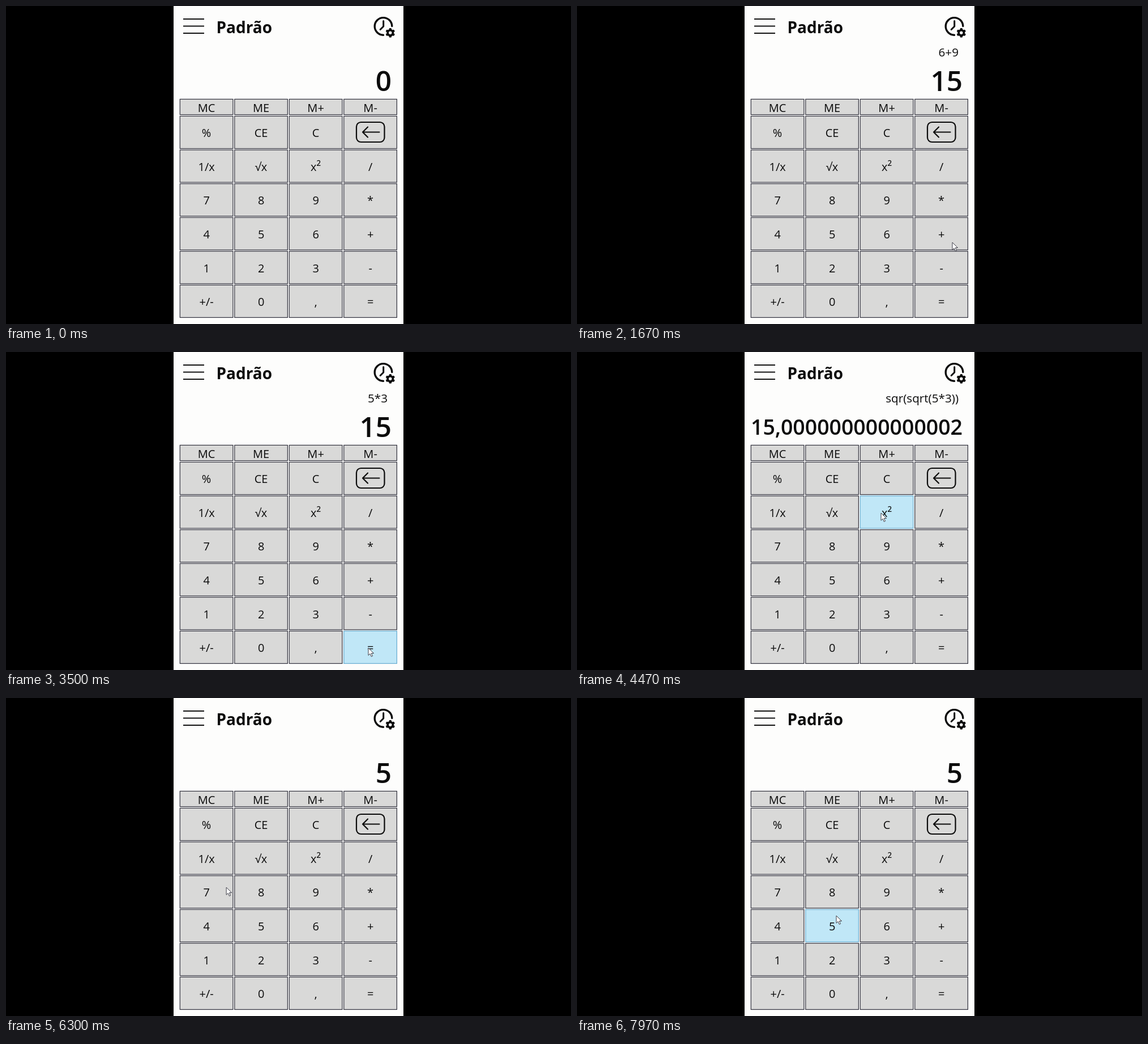
An HTML page that plays this animation: 998 by 561 pixels, repeating every 8000 ms.

```html
<!DOCTYPE html>
<html lang="pt">
<head>
<meta charset="utf-8">
<title>Calculadora</title>
<style>
  html, body { margin: 0; width: 100%; height: 100%; overflow: hidden; background: #000; }
  svg { display: block; width: 100%; height: 100%; }
  text { font-family: "Open Sans", "Noto Sans", sans-serif; fill: #0b0b0b; white-space: pre; }
  .key rect { fill: #d9d9d8; stroke: #30303c; stroke-width: 1.2; }
  .key.hover rect { fill: #c0e7f7; stroke: #67acd0; }
  .key text { font-size: 20px; text-anchor: middle; }
  .line { fill: none; stroke: #0b0b0b; stroke-linecap: round; stroke-linejoin: round; }
  #title { font-size: 28px; font-weight: 700; }
  #expr { font-size: 20.7px; text-anchor: end; }
  #display { font-weight: 600; text-anchor: end; }
</style>
</head>
<body>
<svg viewBox="0 0 998 561">
  <rect width="998" height="561"/>
  <rect x="296" width="406" height="561" fill="#fdfdfc"/>
  <path d="M313 23h37M313 35.5h37M313 48h37" stroke="#111" stroke-width="1.8"/>
  <text id="title" x="371.5" y="47.5">Padrão</text>

  <g class="line" stroke-width="3.4">
    <path d="M666.5 51.2A15.3 15.3 0 1 1 681.8 35.5"/>
    <path d="M666.7 26.5V36l-5.5 5.5" stroke-width="3"/>
  </g>
  <g transform="translate(678.8 47.3)">
    <circle r="4.6" fill="none" stroke="#0b0b0b" stroke-width="3.8"/>
    <g id="teeth" fill="#0b0b0b"></g>
  </g>

  <text id="expr" x="674" y="89"></text>
  <text id="display" x="681"></text>
  <g id="keys"></g>

  <g class="line" stroke-width="2.2">
    <rect x="619" y="205" width="49.5" height="35" rx="8"/>
    <path d="M659.5 222.5H630m9-9l-9 9 9 9"/>
  </g>
  <path id="cursor" d="M0 0V13.2l3.1-2.9 2.2 5 2.2-1-2.2-4.8h4.2z" fill="#fff" stroke="#3c3c46" stroke-width="1"/>
</svg>
<script>
const LOOP = 8000, HOVER_DELAY = 70;
const byId = id => document.getElementById(id);

function add(parent, tag, attrs, text = "") {
  const node = document.createElementNS("http://www.w3.org/2000/svg", tag);
  for (const name in attrs) node.setAttribute(name, attrs[name]);
  node.textContent = text;
  return parent.appendChild(node);
}

for (let angle = 0; angle < 360; angle += 60)
  add(byId("teeth"), "rect", { x: -2, y: -8.3, width: 4, height: 4, rx: .7, transform: `rotate(${angle})` });

const rows = ["MC ME M+ M-", "% CE C ←", "1/x √x x² /", "7 8 9 *", "4 5 6 +", "1 2 3 -", "+/- 0 , ="];
const keys = rows.flatMap((row, r) => row.split(" ").map((label, c) => {
  const x = 307.3 + c * 96.5, y = r ? 194.3 + (r - 1) * 59.6 : 164.4;
  const width = 93.6, height = r ? 57.2 : 27.2;
  const node = add(byId("keys"), "g", { class: "key" });
  add(node, "rect", { x, y, width, height });
  const text = add(node, "text", { x: x + width / 2, y: y + (r ? 36.8 : 22.8) });
  if (label === "x²") {
    add(text, "tspan", {}, "x");
    add(text, "tspan", { dy: -3, "font-size": 22 }, "²");
  } else if (label !== "←") text.textContent = label;
  return { node, contains: p => p.x >= x && p.x <= x + width && p.y >= y && p.y <= y + height };
}));

// Pointer stops: arrival time, x, y, time spent there
const stops = [
  [0, 545, 575, 30], [400, 548, 405, 120], [700, 640, 405, 80], [1000, 548, 350, 100],
  [1350, 650, 520, 100], [1670, 663, 417, 0], [2100, 465, 405, 130], [2600, 641, 365, 170],
  [3080, 552, 462, 100], [3450, 640, 522, 110], [3950, 455, 290, 110], [4250, 537, 284, 230],
  [4900, 548, 228, 150], [5600, 470, 359, 130], [6000, 455, 405, 120], [6450, 340, 281, 650],
  [7700, 458, 384, 300]
];

// Readings: start time, display, expression
const readings = [
  [0, "0", ""], [450, "6", ""], [740, "6+", ""], [1050, "6+9", ""], [1400, "15", "6+9"],
  [2170, "5", ""], [2680, "5*", ""], [3130, "5*3", ""], [3500, "15", "5*3"],
  [4000, "3,872983346207417", "sqrt(5*3)"], [4350, "15,000000000000002", "sqr(sqrt(5*3))"],
  [4980, "0", ""], [6060, "5", ""], [6550, "0,2", "1/(5)"], [6850, "5", "1/(1/(5))"],
  [7900, "5", ""]
];

const latest = (list, t) => list.findLastIndex(item => item[0] <= t);

function pointerAt(t) {
  const i = latest(stops, Math.max(0, t));
  const [start, x, y, stay] = stops[i];
  const next = stops[i + 1];
  if (!next || t <= start + stay) return { x, y };
  const u = (t - start - stay) / (next[0] - start - stay);
  const ease = u * u * (3 - 2 * u);
  return { x: x + (next[1] - x) * ease, y: y + (next[2] - y) * ease };
}

function render(now) {
  const t = now % LOOP;
  const pointer = pointerAt(t), earlier = pointerAt(t - HOVER_DELAY);
  byId("cursor").setAttribute("transform", `translate(${pointer.x} ${pointer.y})`);
  for (const key of keys)
    key.node.classList.toggle("hover", key.contains(pointer) && key.contains(earlier));

  const [, value, expression] = readings[latest(readings, t)];
  const long = value.length > 12;
  const display = byId("display");
  display.textContent = value;
  display.setAttribute("font-size", long ? 37.5 : 49.5);
  display.setAttribute("y", long ? 145.5 : 150);
  byId("expr").textContent = expression;
}

const begin = performance.now();
function tick() {
  render(performance.now() - begin);
  requestAnimationFrame(tick);
}
tick();
</script>
</body>
</html>
```
